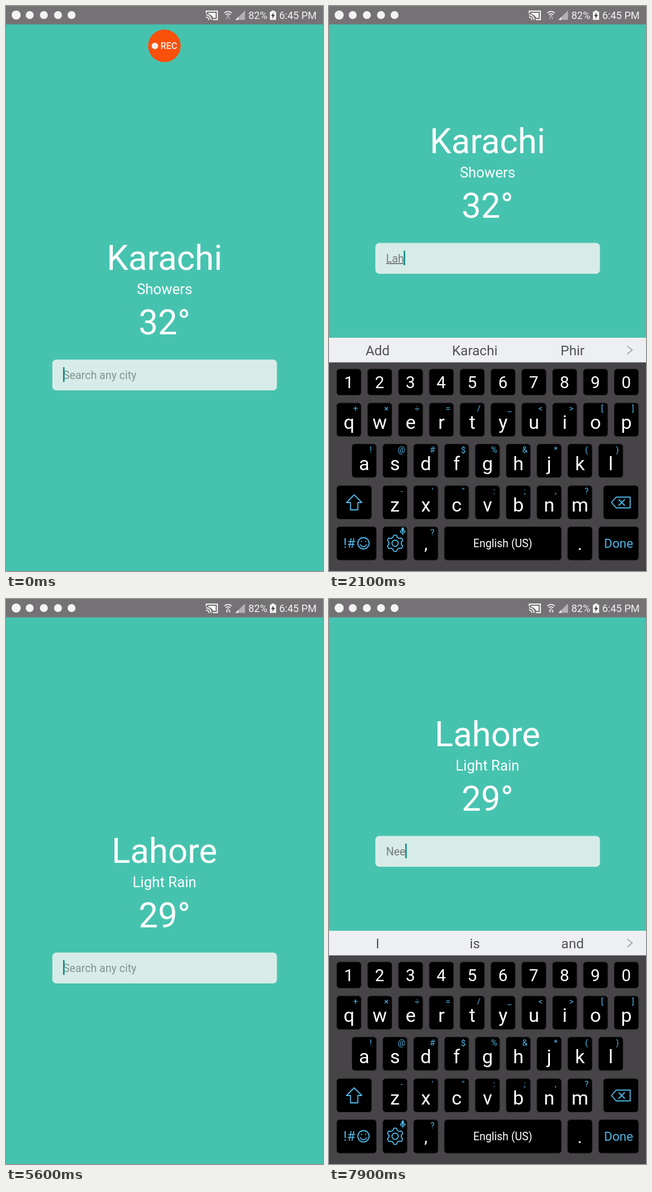
Recreate the animation shown at these times as an HTML page. Size 561x998 px, loop 8000 ms.

```html
<!DOCTYPE html>
<html lang="en">
<head>
<meta charset="utf-8">
<title>Weather search</title>
<style>
  html, body { margin: 0; width: 100%; height: 100%; overflow: hidden; background: #46c3af; }
  svg { display: block; width: 561px; height: 998px; font-family: Roboto, sans-serif; }
  .line { fill: none; stroke: #4fb9e8; stroke-width: 1.8; stroke-linejoin: round; stroke-linecap: round; }
</style>
</head>
<body>
<svg id="stage" viewBox="0 0 561 998">
  <rect width="561" height="998" fill="#46c3af"/>

  <g id="weather" fill="#fff" text-anchor="middle">
    <text id="city" x="280.5" y="466" font-size="61"></text>
    <text id="sky" x="280.5" y="509" font-size="25.5"></text>
    <text id="degrees" x="280.5" y="580" font-size="61"></text>
    <rect x="82" y="624.5" width="397.5" height="54.5" rx="7" fill="#d7ece8"/>
    <text id="query" x="101" y="659" font-size="19.4" text-anchor="start"></text>
    <rect id="cursor" y="638" width="2.6" height="26" fill="#0d8b84"/>
  </g>

  <path id="spinner" fill="none" stroke="#fff" stroke-width="4.2"/>
  <rect id="blank" y="586" width="561" height="412" fill="#f7f7f9"/>

  <g id="keyboard">
    <rect y="629" width="561" height="480" fill="#474448"/>
    <rect y="586" width="561" height="43.5" fill="#eeeff2"/>
    <path d="M528 600.5l8.5 7.2l-8.5 7.2" fill="none" stroke="#98989c" stroke-width="1.6"/>
  </g>

  <g id="record">
    <circle cx="280.3" cy="70.3" r="28.8" fill="#f9500c"/>
    <circle cx="263.5" cy="70.5" r="5.8" fill="#f3eeee"/>
    <text x="273.5" y="76" font-size="16" font-weight="500" fill="#f3eeee">REC</text>
  </g>

  <rect width="561" height="32.5" fill="#757275"/>
  <g fill="#f4f4f4">
    <circle cx="18" cy="16" r="8"/>
    <circle cx="42" cy="16" r="7"/>
    <circle cx="67" cy="16" r="7"/>
    <circle cx="92" cy="16" r="7"/>
    <circle cx="116" cy="16" r="7"/>
    <g fill="none" stroke="#f4f4f4" stroke-width="2">
      <path d="M354.5 13V9H374V24H366M354 15.5a9 9 0 0 1 9 9M354 19.5a5 5 0 0 1 5 5"/>
      <path d="M386.5 12.5a9 9 0 0 1 13 0M389 15.5a5.6 5.6 0 0 1 8 0" stroke-width="1.8"/>
    </g>
    <path d="M358 12h13v9h-4a13 13 0 0 0-9-7z"/>
    <circle cx="393" cy="17.5" r="1.3"/>
    <path id="traffic" d="M389 21l2-2.5l2 2.5h-1.3v3h-1.4v-3zM393.5 21.5h1.3v-3h1.4v3h1.3l-2 2.5z"/>
    <path d="M406 24.5L423 8V24.5z" fill="#b3b1b3"/>
    <path d="M406 24.5L411 19.6V24.5z"/>
    <path d="M467 10h3v-2h5v2h3v14.500h-11z"/>
    <path d="M474 11.500l-5 6h3l-1 5l5-6.500h-3z" fill="#333"/>
    <text x="429" y="23" font-size="18">82%</text>
    <text x="483.500" y="23" font-size="18">6:45 PM</text>
  </g>
</svg>

<script>
const LOOP = 8000, BLUE = '#4fb9e8';
const $ = id => document.getElementById(id);
const clamp = (v, lo = 0, hi = 1) => Math.min(hi, Math.max(lo, v));
const show = (id, on) => $(id).setAttribute('visibility', on ? 'visible' : 'hidden');

function add(tag, attrs, text = '') {
  const el = document.createElementNS('http://www.w3.org/2000/svg', tag);
  for (const name in attrs) el.setAttribute(name, attrs[name]);
  el.textContent = text;
  return $('keyboard').appendChild(el);
}
const label = (text, x, y, size, fill = '#fff') =>
  add('text', { x, y, 'font-size': size, fill, 'text-anchor': 'middle' }, text);
const line = d => add('path', { d, class: 'line' });
const key = (x, y, width = 43.5, height = 59.5) =>
  add('rect', { x, y, width, height, rx: 5.5, fill: '#000', stroke: '#312f32' });
const hint = (text, x, y) => label(text, x + 33.5, y + 15, 15, BLUE);

// Keyboard
const STEP = 54.55;
const letters = [];
function letterRow(chars, hints, x0, y) {
  [...chars].forEach((char, i) => {
    const x = x0 + i * STEP;
    key(x, y);
    hint(hints[i], x, y);
    letters.push({ el: label('', x + 21.8, y, 30), char, y });
  });
}
[...'1234567890'].forEach((digit, i) => {
  key(13.5 + i * STEP, 641, 43.5, 46.5);
  label(digit, 35 + i * STEP, 675, 29.5);
});
letterRow('qwertyuiop', '+×÷=/_<>[]', 13.5, 701);
letterRow('asdfghjkl', '!@#$%&*()', 40.5, 773.5);
letterRow('zxcvbnm', '-\'":;,?', 95, 847);

key(13.5, 847, 62);
line('M44.500 863.500L58 877H51V890H38V877H31z');
key(485.500, 847, 62);
line('M500 877L508 867.500H533V886.500H508zM513 872l10 10M523 872l-10 10');

[[13.5, 70.5], [95, 43.5], [149.5, 43.5], [204, 207.5], [422, 44], [477, 71]]
  .forEach(([x, width]) => key(x, 919.5, width));
label('!#', 36, 957, 24, BLUE);
line('M51 949a10 10 0 1 0 20 0a10 10 0 1 0-20 0M55.500 951.500a6 6 0 0 0 11 0M57.500 945.500v.5M64.500 945.500v.5');
const gear = Array.from({ length: 72 }, (_, i) => {
  const a = i * Math.PI / 36, r = 12.7 + clamp(3 * Math.cos(6 * a), -1.7, 1.7);
  return `${117 + r * Math.sin(a)} ${949 - r * Math.cos(a)}`;
});
line(`M${gear.join('L')}zM111.500 949a5.500 5.500 0 1 0 11 0a5.500 5.500 0 1 0-11 0`);
add('rect', { x: 128.3, y: 921, width: 4.4, height: 8, rx: 2.2, fill: BLUE });
line('M126.500 927a4 4 0 0 0 8 0M130.500 931v2').setAttribute('stroke-width', 1.2);
label(',', 171.5, 960, 30);
hint('?', 149.5, 919.5);
label('English (US)', 307.5, 955.5, 19.3);
label('.', 444, 961, 32);
label('Done', 512.5, 957, 22.3, BLUE);
const suggestions = [86, 258, 431].map(x => label('', x, 617, 24, '#515155'));

// Timeline
const typing = [
  [-100, ''], [1600, 'L'], [1900, 'La'], [2100, 'Lah'], [2300, 'Laho'], [2500, 'Lahor'],
  [2700, 'Lahore'], [3400, ''], [5600, ''], [6900, 'N'], [7300, 'Ne'], [7700, 'Nee']
];
const words = [
  [0, ['Add', 'Karachi', 'Phir']],
  [2600, ['Labored', 'Laborer', "Labor's"]],
  [6600, ['I', 'is', 'and']]
];
const latest = (events, t) => events.filter(([start]) => start <= t).pop();

function drawWeather(t) {
  const before = t < 3400, raised = before ? t >= 200 : t >= 5800;
  $('city').textContent = before ? 'Karachi' : 'Lahore';
  $('sky').textContent = before ? 'Showers' : 'Light Rain';
  $('degrees').textContent = before ? '32°' : '29°';
  $('weather').setAttribute('transform', `translate(0 ${raised ? -206 : 0})`);
  show('weather', before || t >= 4800);
  show('blank', raised);

  const [edited, text] = latest(typing, t), query = $('query');
  query.textContent = text || 'Search any city';
  query.setAttribute('fill', text ? '#77797b' : '#80958f');
  query.setAttribute('text-decoration', text && before ? 'underline' : 'none');
  $('cursor').setAttribute('x', 101 + (text ? query.getComputedTextLength() - 0.5 : 0));
  const focused = before || t >= 5600;
  $('cursor').style.display = focused && (t - edited) % 1000 < 500 ? '' : 'none';
  return text;
}

function drawKeyboard(t, text) {
  const opening = u => [clamp(u), 100 * (1 - clamp(u)) ** 2];
  const closing = u => [1 - clamp(u) ** 2, 100 * clamp(u) ** 2];
  const [opacity, drop] =
    t < 3400 ? opening((t - 250) / 300) :
    t < 5600 ? closing((t - 3440) / 450) : opening((t - 5850) / 300);
  $('keyboard').setAttribute('opacity', opacity);
  $('keyboard').setAttribute('transform', `translate(0 ${drop})`);

  const upper = !text && (t < 3400 || t >= 5600);
  for (const { el, char, y } of letters) {
    el.textContent = upper ? char.toUpperCase() : char;
    el.setAttribute('font-size', upper ? 29.5 : 34);
    el.setAttribute('y', y + (upper ? 44 : 46));
  }
  const [, choices] = latest(words, t);
  suggestions.forEach((el, i) => el.textContent = choices[i]);
}

function drawSpinner(t) {
  show('spinner', t >= 3500 && t < 4800);
  const elapsed = t - 3500, u = clamp(elapsed / 1200);
  const tail = -89 + 0.164 * elapsed, sweep = 22 + 248 * u * u * (3 - 2 * u);
  const point = deg => {
    const a = deg * Math.PI / 180;
    return `${280.3 + 18.6 * Math.cos(a)} ${515.7 + 18.6 * Math.sin(a)}`;
  };
  $('spinner').setAttribute('d',
    `M${point(tail)}A18.6 18.6 0 ${sweep > 180 ? 1 : 0} 1 ${point(tail + sweep)}`);
}

function draw(now) {
  const t = Math.floor(now % LOOP / 100) * 100; // ten pictures a second
  drawKeyboard(t, drawWeather(t));
  drawSpinner(t);
  $('record').setAttribute('opacity', clamp(1 - t / 300));
  $('traffic').setAttribute('opacity', t < 3900 ? 0.4 : 1);
  requestAnimationFrame(draw);
}
draw(performance.now());
</script>
</body>
</html>
```
